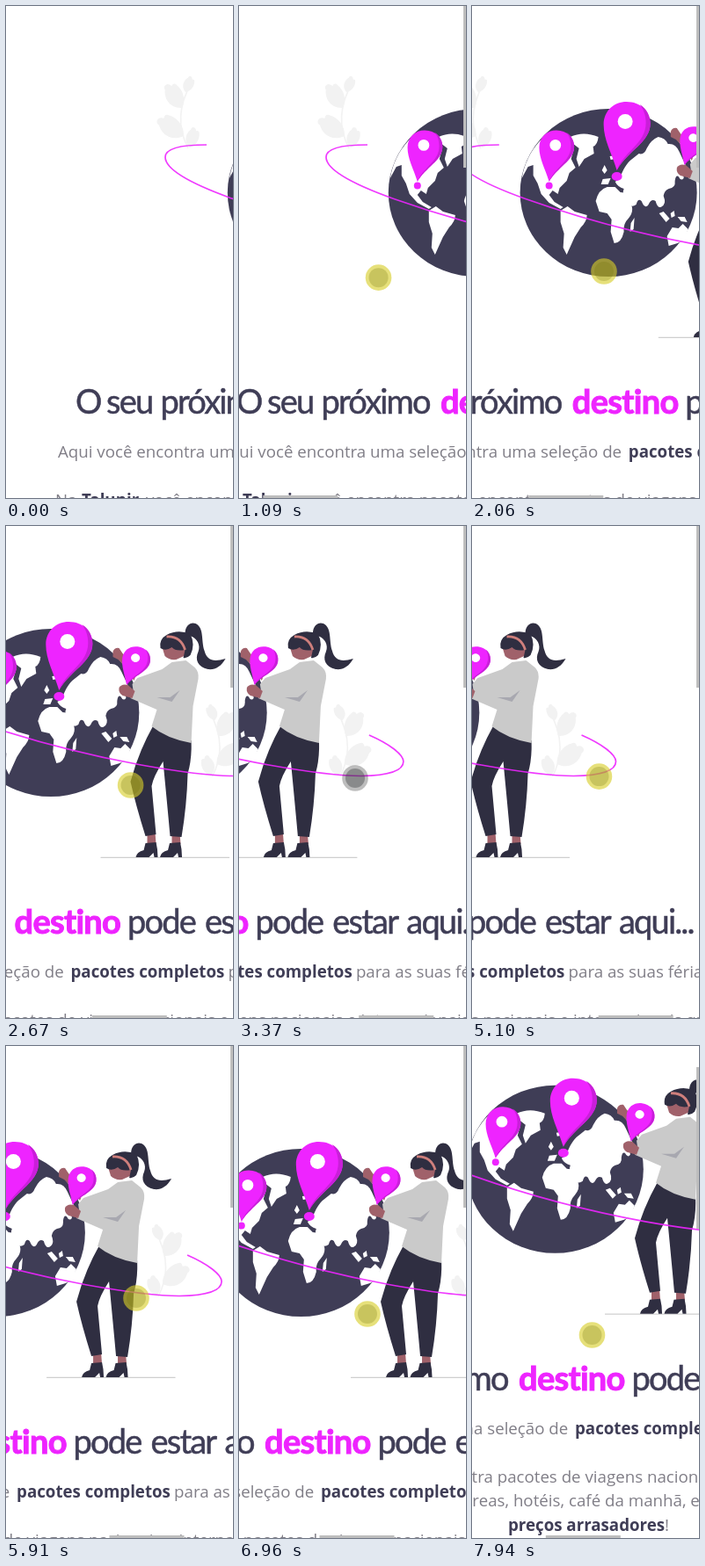
Animation of 258x560 px, one loop 8 s. Source, as an HTML page:

```html
<!DOCTYPE html>
<html lang="pt-BR">
<head>
<meta charset="utf-8">
<style>
html, body { margin: 0; width: 100%; height: 100%; overflow: hidden; background: #fff; }
svg { display: block; width: 258px; height: 560px; }
.title { font: 400 38px Lato, sans-serif; letter-spacing: -1.8px; word-spacing: 3px; fill: #3f3d56; stroke: #3f3d56; stroke-width: .5px; }
.title .key { font-weight: 700; letter-spacing: -.7px; fill: #ee24ff; stroke: #ee24ff; stroke-width: 1px; }
.copy { font: 400 18.72px "Open Sans", sans-serif; fill: #807e87; }
.copy .strong { font-weight: 700; fill: #3f3d56; }
.end { text-anchor: end; }
</style>
</head>
<body>
<svg viewBox="0 0 258 560">
  <defs>
    <path id="leaf" d="M0 0C-12-7-10-19-5-25Q-5-30 0-29Q2-28 3-25Q7-27 8-23C11-15 8-5 0 0Z"/>
    <g id="plant" fill="#f2f2f2">
      <path d="M207 162C194 137 197 111 211 87" fill="none" stroke="#f2f2f2" stroke-width="1.6"/>
      <use href="#leaf" transform="translate(200 116)rotate(-32)scale(1.1)"/>
      <use href="#leaf" transform="translate(204 98)rotate(21)scale(.65)"/>
      <use href="#leaf" transform="translate(202 148)rotate(-55)scale(1.2)"/>
      <use href="#leaf" transform="translate(209 161)rotate(14)scale(.8)"/>
    </g>
    <g id="pin">
      <path fill="#ee24ff" d="M0 0C-6-20-15-35-15-52C-15-68-3-78 11-78C27-78 38-67 38-53C38-32 12-22 0 0Z"/>
      <path fill="#c91fd9" d="M26-75C34-70 38-62 38-53C38-32 12-22 0 0C8-22 33-30 33-54C33-63 30-70 26-75Z"/>
      <circle cx="9.5" cy="-55.5" r="8.5" fill="#fff"/>
    </g>
    <path id="shoe" fill="#2f2e41" d="M97 361L109 360Q111 368 111 377H107L106 372L101 377H86Q87 371 95 369Z"/>
  </defs>

  <g id="page">
    <use href="#plant"/>
    <use href="#plant" transform="matrix(-1 0 0 1 743 123)"/>

    <g transform="translate(196.8 0)">
      <ellipse cx="155.5" cy="212.5" rx="100.5" ry="95.5" fill="#3f3d56"/>
      <g fill="#fff">
        <path d="M57 196C60 180 66 166 78 153L84 147L104 149L116 163L113 174L118 184L111 190L108 199L100 207L98 214L92 210L88 215L94 223L104 229L101 231L88 224L79 214L75 202L70 193L70 181L64 183Z"/>
        <path d="M112 149Q127 142 144 149Q143 158 138 160L139 168L128 174L122 183L119 174L122 162L113 155Z"/>
        <path d="M101 233L109 228L117 234L131 238Q131 245 124 252L117 263L108 283L104 275L105 259L101 246Z"/>
        <path d="M141 222Q144 209 154 206L163 206L169 212L177 213L182 228Q184 235 178 242Q172 248 173 257Q170 270 162 270L158 257L159 243L154 236L145 234Z"/>
        <path d="M168 197C171 189 174 182 180 176L190 168Q196 170 199 162Q204 152 212 149Q220 150 223 157Q232 156 236 166L244 183Q240 188 241 196Q238 200 235 194Q232 192 231 199Q232 207 224 208Q219 210 218 216Q222 226 215 229Q211 230 209 222Q204 219 201 226Q197 232 193 222Q189 218 187 226Q180 231 177 221Q170 214 173 208Q166 206 163 200Z"/>
        <path d="M147 203L149 197L158 196L155 203ZM148 187L151 181L154 187L151 191ZM157 171L164 170L163 174L158 175ZM181 247L185 241L184 254L180 257Z"/>
        <path d="M213 236L218 234L225 242L221 246ZM226 236L230 233L231 239L227 241ZM234 240L242 240L245 246L238 245Z"/>
        <path d="M222 262L228 252L235 253L240 248L246 254Q242 267 234 270L224 273Z"/>
      </g>
      <g fill="#ee24ff">
        <ellipse cx="165" cy="194" rx="6" ry="5"/>
        <circle cx="88" cy="204.5" r="4"/>
      </g>
      <use href="#pin" transform="translate(88 200)scale(.75)"/>
      <use href="#pin" transform="translate(165 187)"/>
    </g>

    <path d="M409 377.3H555.5" stroke="#c4c4c4"/>

    <g transform="translate(363 0)">
      <path fill="#a0616a" d="M60 143Q62 138 67 139L71 145L88 164L84 176L73 159L66 152L60 149Z"/>
      <path fill="#2f2e41" d="M142 123C142 112 149 109 154 111C164 116 160 130 164 142C167 153 174 155 188 151C183 160 176 164 168 163C156 160 153 152 157 143C160 135 155 128 150 126Z"/>
      <path fill="#a0616a" d="M116 138L119 148Q124 153 132 152L143 147L144 132Z"/>
      <path fill="#2f2e41" d="M114 139Q112 129 121 124Q134 117 148 123Q154 135 148 147Q144 151 140 150L142 141Q131 143 127 138Q120 143 114 139Z"/>
      <path d="M121 126Q137 125 142 141" fill="none" stroke="#cf7f7c" stroke-width="2.8"/>
      <path fill="#a0616a" d="M99 349H108L109 362H99ZM127 350H136L137 362H127Z"/>
      <path fill="#2f2e41" d="M106 227L149 244Q150 265 145 282Q144 318 138 354L125 353Q122 320 117 268Q106 285 104 296L109 351L97 353Q86 318 80 291Q89 257 106 227Z"/>
      <use href="#shoe"/><use href="#shoe" x="27.5"/>
      <path fill="#cacaca" d="M127 155L143 153L153 161Q158 166 157 174L151 205L149 247Q121 242 104 228L110 209L80 196L83 187L82 180L88 173L116 163Z"/>
      <path fill="#a8a8b0" d="M110 195L125 195L136 187L127 200Z"/>
      <use href="#pin" transform="translate(75.5 181)rotate(8)scale(.6 .577)"/>
      <path fill="#a0616a" d="M67 184Q70 179 77 181L85 188L82 196L71 193Q66 190 67 184Z"/>
    </g>

    <path fill="none" stroke="#ee24ff" stroke-opacity=".9" stroke-width="1.7" d="M228 158C200 158 181 162 181 172C181 186 212 203 258 219.5C330 245 400 262 455 272C500 280 535 284.5 560 284.5C590 284 608 279 608 268C608 260 592 248 569 238"/>

    <g class="title">
      <text x="79" y="464">O</text>
      <text x="114" y="464">seu</text>
      <text x="175.5" y="464">próximo</text>
      <text x="311" y="464" class="key">destino</text>
      <text x="439.5" y="464">pode estar aqui...</text>
    </g>
    <g class="copy">
      <text x="59" y="514">Aqui você encontra uma seleção de</text>
      <text x="375" y="514" class="strong">pacotes completos</text>
      <text x="554" y="514">para as suas férias!</text>
      <text x="56" y="569">Na</text>
      <text x="86" y="569" class="strong">Talunir</text>
      <text x="159" y="569">você encontra pacotes de viagens nacionais e internacionais que</text>
      <text x="363" y="596.5" class="end">incluem passagens aéreas, hotéis,</text>
      <text x="368" y="596.5">café da manhã, entre outros, com</text>
      <text x="299" y="624"><tspan class="strong">preços arrasadores</tspan>!</text>
    </g>
  </g>

  <g id="bars" fill="#bdbdbd">
    <rect id="barY" x="255" width="3" height="184"/>
    <rect id="barX" y="557" width="85" height="3"/>
  </g>
  <g id="cursor">
    <circle id="halo" r="14.8"/>
    <circle id="core" r="11"/>
  </g>
</svg>
<script>
const LOOP = 8000;
const el = id => document.getElementById(id);

// Rows of [time, scroll x, scroll y]
const scroll = [[0, 0, 0], [400, 0, 0], [2060, 197, 0], [3370, 421, 0], [4190, 505, 0], [4500, 505, 0],
  [5910, 363, 0], [6960, 282, 0], [7500, 268, 0], [7940, 258, 72], [8000, 257, 82]];
// Rows of [time, x, y]
const pointer = [[0, 280, 335], [700, 162, 312], [2060, 150, 302], [3370, 132, 287], [4190, 140.5, 283],
  [5910, 148, 287], [6960, 146, 305], [7940, 136.5, 329], [8000, 136, 330]];

function sample(keys, t) {
  const i = Math.max(1, keys.findIndex(k => k[0] >= t));
  const a = keys[i - 1], b = keys[i], p = (t - a[0]) / (b[0] - a[0]);
  return [1, 2].map(n => a[n] + (b[n] - a[n]) * p);
}

function draw(now) {
  const t = now % LOOP;
  const [sx, sy] = sample(scroll, t);
  const [px, py] = sample(pointer, t);
  const touching = t > 3050 && t < 3650;
  el('page').setAttribute('transform', `translate(${-sx} ${-sy})`);
  el('barX').setAttribute('x', 1 + sx * .321);
  el('barY').setAttribute('y', sy / 3);
  el('bars').setAttribute('opacity', t < 420 ? 0 : 1);
  el('cursor').setAttribute('transform', `translate(${px} ${py})`);
  el('halo').setAttribute('fill', touching ? 'rgba(0,0,0,.26)' : 'rgba(215,205,40,.62)');
  el('core').setAttribute('fill', touching ? 'rgba(60,62,66,.4)' : 'rgba(110,110,10,.25)');
}

const start = performance.now();
function tick() {
  draw(performance.now() - start);
  requestAnimationFrame(tick);
}
tick();
</script>
</body>
</html>
```
